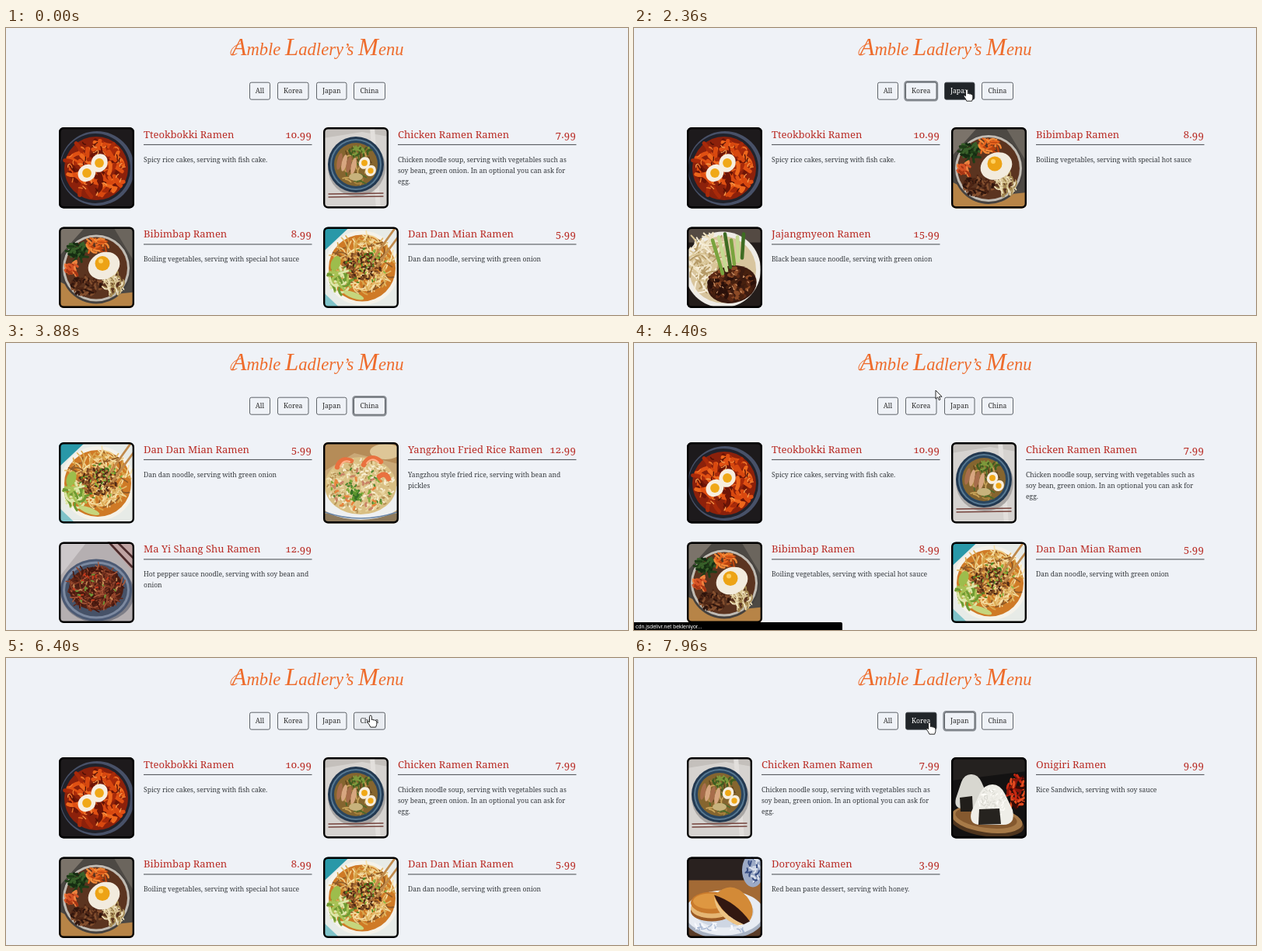
An HTML page that plays this animation: 800x370 px, repeating every 8000 ms.

```html
<!DOCTYPE html>
<html lang="en">
<head>
<meta charset="utf-8">
<title>Menu</title>
<style>
  html, body { margin: 0; width: 100%; height: 100%; overflow: hidden; background: #eff2f7; }
  svg { display: block; }
  text { font-family: "Noto Serif", serif; font-weight: 300; }
  .brand { font: italic 22.6px "Liberation Serif", serif; fill: #ee6c2c; }
  .cap { font-size: 31px; }
  .swash { fill: none; stroke: #ee6c2c; stroke-linecap: round; }
  .btn text { font-size: 8.6px; text-anchor: middle; }
  .dish { font-size: 13px; fill: #b92c25; font-feature-settings: "onum"; }
  .price { font-size: 13.3px; text-anchor: end; }
  .note { font-size: 8.55px; fill: #34383c; }
  .status { font: 7px "Liberation Sans", sans-serif; fill: #fff; }
</style>
</head>
<body>
<svg id="stage" width="800" height="370" viewBox="0 0 800 370">
  <defs>
    <clipPath id="clip97"><rect width="97" height="104.5" rx="6"/></clipPath>
    <clipPath id="clip84"><rect width="84" height="104.5" rx="6"/></clipPath>
    <filter id="soft" x="0" y="0" width="1" height="1"><feGaussianBlur stdDeviation=".6"/></filter>
  </defs>
  <text class="brand" x="401" y="35" text-anchor="middle"><tspan class="cap">A</tspan>mble <tspan class="cap">L</tspan>adlery’s <tspan class="cap">M</tspan>enu</text>
  <path class="swash" d="M297 33q-9 5-8-2 2-8 13-11"/>
  <g id="buttons"></g>
  <g id="lists"></g>
  <g id="status">
    <path d="M0 360H266q2 0 2 2V370H0z"/>
    <text class="status" x="2" y="368">cdn.jsdelivr.net bekleniyor...</text>
  </g>
  <g id="cursor" fill="#fff" stroke="#111" stroke-width=".9" stroke-linejoin="round">
    <path id="arrow" d="M0 0V11.2L2.6 8.8 4.3 12.6 6 11.8 4.4 8.2H8z"/>
    <path id="hand" d="M-1.5 1.5a1.4 1.4 0 0 1 2.8 0V5.6q1.3-.8 2.2.4 1.3-.6 2.1.5 2.2-.4 2.2 2v3L6.6 15.2H-.2Q-1.4 12-3.8 9.2q-.8-1.7.7-1.8L-1.5 8.8z"/>
  </g>
</svg>
<script>
const LOOP = 8000, FADE = 150, RELOAD = 3920;
const el = id => document.getElementById(id);
const smooth = u => { u = Math.min(1, Math.max(0, u)); return u * u * (3 - 2 * u); };
const lerp = (a, b, u) => a + (b - a) * u;

// Drawing helpers for the dishes
const oval = (x, y, rx, ry, fill, turn = 0) =>
  `<ellipse cx="${x}" cy="${y}" rx="${rx}" ry="${ry}" fill="${fill}" transform="rotate(${turn} ${x} ${y})"/>`;
const disc = (x, y, r, fill) => oval(x, y, r, r, fill);
const shape = (d, fill) => `<path d="${d}" fill="${fill}"/>`;
const line = (d, color, width) =>
  `<path d="${d}" fill="none" stroke="${color}" stroke-width="${width}" stroke-linecap="round"/>`;
const backdrop = fill => shape("M0 0H97V105H0z", fill);
const egg = (x, y, r, turn) => oval(x, y, r, r * 1.15, "#f7eedf", turn) + disc(x, y, r * .56, "#f0a817");

function random(seed) {
  return () => (seed = (seed * 16807) % 2147483647) / 2147483647;
}

// Short curved strands spread over an ellipse
function strands(seed, count, x, y, rx, ry, colors, length, width) {
  const rnd = random(seed * 7919);
  let out = "";
  for (let i = 0; i < count; i++) {
    const a = rnd() * 6.283, r = Math.sqrt(rnd()), turn = rnd() * 6.283, bend = (rnd() - .5) * length;
    const px = x + rx * r * Math.cos(a), py = y + ry * r * Math.sin(a);
    const dx = Math.cos(turn) * length, dy = Math.sin(turn) * length;
    const mx = dx / 2 - Math.sin(turn) * bend, my = dy / 2 + Math.cos(turn) * bend;
    const d = [px - dx / 2, py - dy / 2].map(v => v.toFixed(1)) +
      "q" + [mx, my, dx, dy].map(v => v.toFixed(1));
    out += line("M" + d, colors[i % colors.length], width);
  }
  return out;
}

const photos = {
  tteok: () => backdrop("#1d1a1c") + disc(49, 53, 48, "#485168") + disc(47, 53, 45, "#20222b") +
    disc(48, 53, 41, "#8c210b") +
    strands(3, 75, 48, 53, 35, 35, ["#d8480f", "#ee671c", "#6e1507", "#e05013", "#a82a0a"], 14, 5) +
    strands(5, 45, 48, 53, 37, 37, ["#f59a4c", "#4f0f05", "#f27b2e"], 5, 1.3) +
    egg(52, 46, 10.5, 25) + egg(36, 59, 10.5, 50),
  chicken: () => backdrop("#d6d3d0") + shape("M0 0H84V12L50 6 0 14z", "#c4c0bc") +
    shape("M60 0H66L74 105H68z", "#e2dfdc") + oval(43, 52, 37, 37, "#a9a6a4") +
    disc(42, 48, 36, "#223850") + disc(42, 48, 33, "#587992") + disc(42, 48, 31, "#29455f") +
    disc(42, 48, 28, "#85652f") +
    strands(4, 45, 42, 50, 23, 23, ["#c9a45a", "#64461e", "#4d6a2a", "#a8853f"], 8, 1.8) +
    strands(8, 24, 47, 32, 13, 7, ["#7d9a3c", "#3f5d20"], 6, 2.2) +
    [0, 1, 2, 3].map(i => oval(21 + i * 6, 44 + i * 2, 3.2, 11, i % 2 ? "#d7a680" : "#a76d4b", 12)).join("") +
    egg(53, 46, 7, 30) + egg(61, 56, 6.5, 40) + oval(42, 64, 9, 5, "#c7b27c") +
    line("M7 86L77 85M7 90L77 89", "#76453e", 1.4),
  bibim: () => backdrop("#4d4944") + shape("M0 0H34L0 38z", "#7b736a") + shape("M70 0H97V45z", "#6b655d") +
    shape("M0 70L40 90 97 84V105H0z", "#b78447") + disc(48, 54, 45, "#45413e") +
    disc(48, 53, 43, "#c0bbb3") + disc(48, 53, 40, "#5b3420") +
    strands(2, 35, 24, 32, 13, 11, ["#1f3d18", "#38602a", "#152c12"], 7, 3) +
    strands(6, 28, 49, 24, 13, 8, ["#e5641f", "#f28a38", "#b9430f"], 9, 2.4) +
    strands(7, 22, 17, 54, 7, 10, ["#d75426", "#f0823f", "#a43414"], 7, 3) +
    strands(9, 75, 36, 76, 20, 12, ["#4c2414", "#85502f", "#2f150d"], 4, 2.4) +
    strands(11, 50, 70, 72, 13, 14, ["#dac796", "#a58a52", "#efe2bd"], 10, 1.7) +
    oval(58, 50, 21, 17, "#f2ebde", -25) + disc(56, 47, 9.5, "#eda315") + disc(54, 44, 3, "#ffd160"),
  dandan: () => backdrop("#e7ebe7") + shape("M0 0H34L0 32z", "#2998a8") + shape("M0 84L22 105H0z", "#7fc3c9") +
    disc(50, 53, 48, "#f5f2e9") + disc(50, 53, 43, "#cf7a26") +
    strands(3, 190, 52, 47, 38, 35, ["#efd08b", "#d8a64d", "#f6e0a8", "#8f5a27", "#e4ba6b"], 16, 1.7) +
    strands(10, 110, 50, 50, 26, 18, ["#7a4520", "#4e2a15", "#a66a35"], 3, 2.4) +
    strands(12, 40, 21, 68, 13, 15, ["#a8c255", "#6f9a32", "#dfe6a8"], 12, 3) +
    oval(16, 47, 6, 10, "#9dbd4c", 20) + oval(39, 88, 14, 4, "#c6d57d", 20) +
    strands(13, 36, 54, 49, 27, 24, ["#4f8a26", "#86b83c"], 2.5, 1.7) +
    line("M92 2L62 44M97 12L69 50", "#c08a4c", 2.8),
  jajang: () => backdrop("#241d1b") + shape("M0 0H97V20H0z", "#544a43") + disc(46, 55, 49, "#efece6") +
    disc(46, 55, 43, "#d8c59e") +
    strands(3, 110, 27, 46, 25, 34, ["#eee2c4", "#d9c596", "#f7eed8", "#b59a66"], 22, 2) +
    oval(58, 74, 32, 24, "#3c1b10", -12) +
    strands(5, 90, 57, 73, 29, 21, ["#5d2a15", "#2a100a", "#8c4a26", "#46200f"], 4, 4.5) +
    strands(6, 26, 56, 72, 26, 18, ["#d59a6c"], 2, 1.1) +
    [0, 1, 2, 3, 4, 5].map(i => line(`M${33 + i * 8} ${17 - i % 3 * 4}L${46 + i * 5} ${60 - i * 4}`,
      ["#79a43e", "#c5d991", "#3e6c23"][i % 3], 4.5)).join(""),
  yang: () => backdrop("#c9a877") + shape("M0 0H97V28L40 14 0 38z", "#b58c58") + oval(80, 12, 20, 10, "#dec697") +
    shape("M0 92H97V105H0z", "#8e7a5c") + oval(48, 72, 56, 28, "#eef0f1") +
    line("M2 90Q48 106 95 90", "#6a86a8", 1.4) + oval(48, 56, 46, 37, "#d9bf83") +
    strands(3, 380, 48, 56, 44, 34, ["#f1e3b8", "#dfc78d", "#f8efd3", "#b48f52", "#e8d5a0"], 3, 1.9) +
    strands(7, 50, 48, 60, 40, 29, ["#4f862f", "#7faa3a"], 2.4, 2.2) +
    strands(9, 26, 48, 62, 38, 26, ["#e7843d", "#c98467"], 4, 2.8) +
    strands(14, 18, 40, 68, 8, 7, ["#356f25", "#5c962f"], 4, 3) +
    line("M18 32q4-13 18-8M52 29q8-15 22-4M72 44q8-6 12 3", "#e9713f", 6.5) +
    line("M22 31q4-9 12-6M56 27q7-9 15-1", "#ffb58c", 2),
  mayi: () => backdrop("#b5afb1") + shape("M0 0H36L0 46z", "#cdc8ca") + shape("M62 0H97V40z", "#bfa3a2") +
    oval(50, 66, 47, 38, "#7e7e87") + oval(48, 62, 46, 40, "#4c5a74") + oval(48, 62, 43, 37, "#7c89a0") +
    oval(48, 62, 40, 34, "#465268") + oval(48, 60, 35, 28, "#4d1f14") +
    strands(3, 190, 48, 59, 34, 27, ["#7b3420", "#45160d", "#a8583a", "#612516", "#8f4228"], 13, 1.5) +
    strands(8, 40, 48, 59, 30, 23, ["#6d9a37", "#c93a1c", "#c58b55"], 3, 1.8) +
    line("M64 0L94 32M75 0L97 22", "#4b2a2b", 2.6),
  onigiri: () => backdrop("#131212") + shape("M0 0H97V18L0 30z", "#24211f") +
    strands(3, 40, 84, 44, 11, 20, ["#c92a12", "#8c160a", "#e24d20", "#3a0a05"], 10, 3) +
    oval(46, 84, 48, 18, "#4f351e", 8) + oval(46, 80, 46, 17, "#a77a48", 8) +
    oval(45, 78, 40, 13, "#85592f", 8) +
    shape("M25 22Q34 21 39 32L47 50Q50 64 38 66H15Q3 66 6 53L13 32Q17 22 25 22z", "#d8d7d0") +
    shape("M11 52L27 50 28 70H12z", "#211e1a") +
    shape("M53 35Q63 35 69 47L79 68Q83 87 67 87H36Q22 86 26 70L37 46Q43 35 53 35z", "#efeee8") +
    strands(5, 120, 53, 59, 18, 19, ["#fffefa", "#d9d8d1", "#e9e8e1"], 3, 1.3) +
    shape("M36 67L62 66 64 86 35 87z", "#26231f"),
  doroyaki: () => backdrop("#5a3c28") + shape("M0 0H97V34H0z", "#29211f") + shape("M0 30H97V62H0z", "#a36a35") +
    oval(85, 17, 14, 22, "#9caac5") + strands(3, 22, 85, 17, 9, 16, ["#374d83", "#dbe2ed"], 6, 2) +
    oval(48, 75, 53, 31, "#a8b2c3") + oval(48, 72, 51, 29, "#e8ecf3") + oval(48, 71, 38, 20, "#ced6e3") +
    strands(7, 22, 47, 90, 38, 8, ["#a9b8d3", "#f8faff"], 6, 1.5) +
    oval(32, 70, 27, 13, "#9a5924") + oval(32, 66, 27, 13, "#e5b674") + oval(32, 59, 27, 14, "#c97a2c") +
    oval(30, 57, 22, 10, "#de9741") +
    shape("M36 49Q57 28 77 51q13 16 4 31Q62 83 36 49z", "#d38a37") +
    shape("M35 49Q63 58 81 83L73 87Q45 75 35 49z", "#321711") +
    shape("M35 51Q45 75 73 87L65 88Q37 77 35 51z", "#edc384")
};

const menu = {
  tteok: ["Tteokbokki Ramen", "10.99", "Spicy rice cakes, serving with fish cake."],
  chicken: ["Chicken Ramen Ramen", "7.99", "Chicken noodle soup, serving with vegetables such as",
    "soy bean, green onion. In an optional you can ask for", "egg."],
  bibim: ["Bibimbap Ramen", "8.99", "Boiling vegetables, serving with special hot sauce"],
  dandan: ["Dan Dan Mian Ramen", "5.99", "Dan dan noodle, serving with green onion"],
  jajang: ["Jajangmyeon Ramen", "15.99", "Black bean sauce noodle, serving with green onion"],
  yang: ["Yangzhou Fried Rice Ramen", "12.99", "Yangzhou style fried rice, serving with bean and", "pickles"],
  mayi: ["Ma Yi Shang Shu Ramen", "12.99", "Hot pepper sauce noodle, serving with soy bean and", "onion"],
  onigiri: ["Onigiri Ramen", "9.99", "Rice Sandwich, serving with soy sauce"],
  doroyaki: ["Doroyaki Ramen", "3.99", "Red bean paste dessert, serving with honey."]
};
const lists = {
  all: ["tteok", "chicken", "bibim", "dandan"],
  korea: ["tteok", "bibim", "jajang"],
  japan: ["chicken", "onigiri", "doroyaki"],
  china: ["dandan", "yang", "mayi"]
};

function card(key, i) {
  const [name, price, ...notes] = menu[key];
  const w = key === "chicken" ? 84 : 97, left = w + 12;
  return `<g transform="translate(${68 + i % 2 * 340} ${128 + (i >> 1) * 128.5})">
    <g clip-path="url(#clip${w})"><g filter="url(#soft)">${photos[key]()}</g></g>
    <rect x="1.2" y="1.2" width="${w - 2.4}" height="102.1" rx="5" fill="none" stroke="#000" stroke-width="2.4"/>
    <text class="dish" x="${left}" y="13.7">${name}</text>
    <text class="dish price" x="325" y="13.7">${price}</text>
    <path d="M${left} 22.4H325.5" stroke="#33373b" stroke-width=".9"/>
    ${notes.map((s, n) => `<text class="note" x="${left}" y="${44.5 + n * 14.4}">${s}</text>`).join("")}
  </g>`;
}

const buttons = [["All", 313.5, 26], ["Korea", 349.5, 39.5], ["Japan", 399.5, 38.5], ["China", 447.5, 40]];

el("lists").innerHTML = Object.entries(lists)
  .map(([id, keys]) => `<g id="${id}">${keys.map(card).join("")}</g>`).join("");
el("buttons").innerHTML = buttons.map(([name, x, w]) => `<g class="btn">
  <rect x="${x - 1.2}" y="69" width="${w + 2.4}" height="24.4" rx="3.2" fill="none" stroke="#343a40" stroke-width="2"/>
  <rect x="${x}" y="70.2" width="${w}" height="22" rx="2.2" fill="#212529" stroke="#3c4146" stroke-width=".8"/>
  <text x="${x + w / 2}" y="84">${name}</text></g>`).join("");

// Time line: pointer stops, shown list, focused button
const path = [[0, 318, -20], [40, 318, -16], [640, 326, 78], [880, 326, 78], [1200, 327, 83], [1345, 327, 83],
  [1385, 373, 85], [1760, 373, 85], [2080, 370, 82], [2200, 426, 78], [2360, 428, 79], [2660, 428, 79],
  [2840, 476, 80], [3160, 476, 80], [3560, 330, -20], [4080, 330, -20], [4400, 388, 61], [4680, 396, 62],
  [4760, 396, 62], [5520, 500, 58], [5680, 500, 58], [6120, 478, 58], [6320, 478, 60], [6360, 477, 60],
  [6400, 469, 74], [6480, 468, 80], [7200, 468, 80], [7380, 420, 80], [7620, 420, 80], [7800, 381, 83],
  [LOOP, 380, 83]];
const shown = [[0, "all"], [1720, "korea"], [2500, "japan"], [3000, "china"], [RELOAD, "all"],
  [6560, "china"], [7460, "japan"]];
const focus = [[[940, 1700]], [[1700, 2480]], [[2480, 2920], [7440, 9000]], [[2920, RELOAD, 1], [6540, 7440]]];

function pointer(t) {
  const i = path.findIndex(p => p[0] > t), [t0, x0, y0] = path[i - 1], [t1, x1, y1] = path[i];
  const u = smooth((t - t0) / (t1 - t0));
  return [lerp(x0, x1, u), lerp(y0, y1, u)];
}
const over = ([x, y]) => buttons.findIndex(([, bx, w]) => x >= bx && x <= bx + w && y >= 70 && y <= 93);

// Hover spans follow from where the pointer is
const hover = buttons.map(() => []);
for (let t = 0, last = -1; t < LOOP; t += 2) {
  const now = over(pointer(t));
  if (now === last) continue;
  if (last >= 0) hover[last].at(-1)[1] = t;
  if (now >= 0) hover[now].push([t, 9000]);
  last = now;
}

const level = (spans, t) => Math.max(0, ...spans.map(([a, b, fade = FADE]) =>
  Math.min(smooth((t - a) / FADE), 1 - smooth((t - b) / fade))));
const show = (node, on) => node.setAttribute("visibility", on ? "visible" : "hidden");
const groups = [...document.querySelectorAll(".btn")];

function render(now) {
  const t = now % LOOP, at = pointer(t), hand = over(at) >= 0;
  const current = shown.findLast(([start]) => start <= t)[1];
  for (const id in lists) el(id).style.display = id === current ? "" : "none";
  groups.forEach((g, i) => {
    const [ring, box, label] = g.children, lit = level(hover[i], t);
    const shade = Math.round(lerp(45, 255, lit));
    ring.setAttribute("opacity", level(focus[i], t) * .55);
    box.setAttribute("fill-opacity", lit);
    label.setAttribute("fill", `rgb(${shade},${shade},${shade})`);
  });
  show(el("status"), t >= 4000 && t < 4780);
  show(el("hand"), hand);
  show(el("arrow"), !hand);
  el("cursor").setAttribute("transform", `translate(${at[0]} ${at[1]})`);
  requestAnimationFrame(render);
}
render(0);
</script>
</body>
</html>
```
